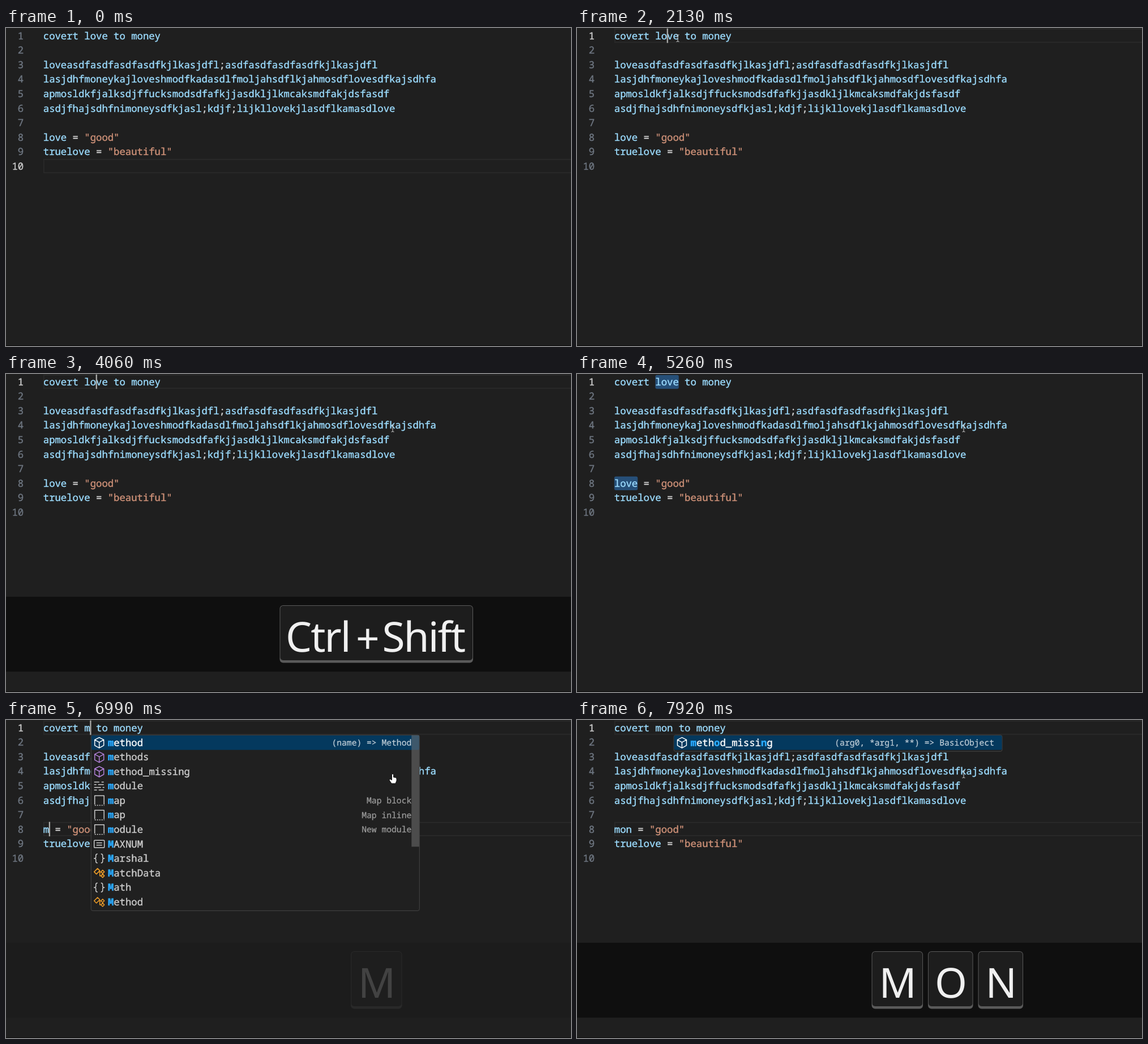
Write an HTML page that moves like this. It is 998 px wide and 561 px high and loops after 8 s.

```html
<!DOCTYPE html>
<html lang="en">
<head>
<meta charset="utf-8">
<title>Multi-cursor editing</title>
<style>
html, body { margin: 0; width: 100%; height: 100%; overflow: hidden; background: #1f1f1f; }
svg { display: block; width: 998px; height: 561px; }
text { white-space: pre; text-rendering: geometricPrecision; }
.mono { font: 17.27px "Noto Sans Mono", monospace; stroke-width: .4px; }
.detail { font: 14.68px "Noto Sans Mono", monospace; text-anchor: end; stroke-width: .25px; }
.key { font: 73px "Noto Sans", "Open Sans", sans-serif; letter-spacing: -2px; stroke: none; }
.icon { fill: none; stroke-width: 1.5; stroke-linejoin: round; }
</style>
</head>
<body>
<svg id="stage" viewBox="0 0 998 561"></svg>
<script>
const stage = document.getElementById('stage');
const LOOP = 8000, CHAR = 10.362, ROW = 25.56, LEFT = 65.8;
const colX = c => LEFT + c * CHAR;
const rowY = r => 0.8 + (r - 1) * ROW;
const baseY = r => 19.8 + (r - 1) * ROW;

const CLICK = 2060, SELECT = 4460;
const BLINKS = [[2600, 3060], [3530, 4060], [4990, 5460], [5990, 6450], [7920, 8000]];
const within = (t, a, b) => t >= a && t < b;
const esc = s => s.replace(/&/g, '&amp;').replace(/</g, '&lt;').replace(/>/g, '&gt;');

const rect = (x, y, w, h, fill, more = '') =>
  `<rect x="${x}" y="${y}" width="${w}" height="${h}" fill="${fill}" ${more}/>`;
// A hairline stroke in the text colour gives the slightly heavier editor face
const ink = color => `fill="${color}" stroke="${color}"`;
const text = (x, y, body, cls, color, more = '') =>
  `<text x="${x}" y="${y}" class="${cls}" ${ink(color)} ${more}>${body}</text>`;
const span = (body, color, more = '') => `<tspan ${ink(color)} ${more}>${body}</tspan>`;

const typedAt = t => t < 6990 ? 'love' : t < 7190 ? 'm' : t < 7390 ? 'mo' : 'mon';

const codeLines = word => [
  `covert ${word} to money`,
  '',
  'loveasdfasdfasdfasdfkjlkasjdfl;asdfasdfasdfasdfkjlkasjdfl',
  'lasjdhfmoneykajloveshmodfkadasdlfmoljahsdflkjahmosdflovesdfkajsdhfa',
  'apmosldkfjalksdjffucksmodsdfafkjjasdkljlkmcaksmdfakjdsfasdf',
  'asdjfhajsdhfnimoneysdfkjasl;kdjf;lijkllovekjlasdflkamasdlove',
  '',
  `${word} = "good"`,
  'truelove = "beautiful"',
  ''
];

const colorize = line => (line.match(/"[^"]*"|[;=]|[^";=]+/g) || [])
  .map(p => span(p, p[0] === '"' ? '#ce9178' : /^[;=]$/.test(p) ? '#d4d4d4' : '#9cdcfe'))
  .join('');

function editor(t) {
  const word = typedAt(t), active = t < CLICK ? 10 : 1;
  const selecting = within(t, SELECT, 6990), multi = t >= SELECT;
  let out = '';
  if (!selecting) {
    for (const r of t >= 6990 ? [1, 8] : [active])
      out += rect(LEFT + 1, rowY(r) + 1, 940, 23.4, 'none', 'stroke="#292929" stroke-width="2"');
  } else {
    for (const [r, c] of [[1, 7], [8, 0]])
      out += rect(colX(c), rowY(r) + 1, 4 * CHAR, 24.4, '#264f78', 'rx="3"');
  }
  codeLines(word).forEach((line, i) => {
    const r = i + 1;
    out += text(31.2, baseY(r), r, 'mono', r === active ? '#cccccc' : '#6e7681', 'text-anchor="end"');
    if (line) out += text(LEFT, baseY(r), colorize(line), 'mono', '#9cdcfe');
  });
  if (t >= CLICK && !BLINKS.some(b => within(t, ...b))) {
    const spots = multi ? [[1, 7 + word.length], [8, word.length]] : [[1, 9]];
    for (const [r, c] of spots) out += rect(colX(c) - 0.4, rowY(r), 2.2, ROW, '#aeafad');
  }
  return out;
}

// Icons are drawn around (0, 0)
const ICONS = {
  method: ['#b180d7', '<path d="M0-9 8-5V5L0 9.5-8 5V-5ZM-8-5 0-.5 8-5M0-.5V9.5"/>'],
  keyword: ['#cccccc', '<path d="M-9-7H0M4-7H8M-9-2.5H-5M-2-2.5H8M-9 2.5H3M6 2.5H9M-9 7H-4M-1 7H8"/>'],
  snippet: ['#cccccc', '<path d="M-8 7V-8.5H8.5V7"/><path d="M-8 8.5H9" stroke-dasharray="2 2"/>'],
  constant: ['#cccccc', '<rect x="-9" y="-6.5" width="18" height="13" rx="1"/><path d="M-5-2H5M-5 2H5"/>'],
  module: ['#cccccc', '<path d="M-3-8Q-6-8-6-5V-2Q-6 0-9 0-6 0-6 2V5Q-6 8-3 8M3-8Q6-8 6-5V-2Q6 0 9 0 6 0 6 2V5Q6 8 3 8"/>'],
  class: ['#ee9d28', '<path d="M-9-2-3-8 1-4-5 2ZM-1-2H4M1-2V5H4M6-5 9-2 6 1 3-2ZM6 2 9 5 6 8 3 5Z"/>']
};

const SUGGEST = {
  m: [
    ['method', 'method', '(name) => Method'],
    ['method', 'methods'],
    ['method', 'method_missing'],
    ['keyword', 'module'],
    ['snippet', 'map', 'Map block'],
    ['snippet', 'map', 'Map inline'],
    ['snippet', 'module', 'New module'],
    ['constant', 'MAXNUM'],
    ['module', 'Marshal'],
    ['class', 'MatchData'],
    ['module', 'Math'],
    ['class', 'Method']
  ],
  mo: [
    ['keyword', 'module'],
    ['snippet', 'module', 'New module'],
    ['class', 'Module'],
    ['method', 'method', '(name) => Method'],
    ['method', 'methods'],
    ['method', 'method_missing'],
    ['class', 'Method']
  ],
  mon: [['method', 'method_missing', '(arg0, *arg1, **) => BasicObject']]
};

function matched(label, query, color) {
  let q = 0;
  return [...label].map(ch => {
    const hit = q < query.length && ch.toLowerCase() === query[q];
    if (hit) q++;
    return hit ? span(ch, '#2aaaff', 'font-weight="700"') : span(ch, color);
  }).join('');
}

const queryAt = t => t < 6990 ? '' : t < 7260 ? 'm' : t < 7450 ? 'mo' : 'mon';

function popup(t) {
  const query = queryAt(t);
  if (!query) return '';
  const items = SUGGEST[query], x = colX(7 + query.length) + 1.6, top = 27;
  let out = rect(x, top - 0.3, 580, items.length * ROW + 3, '#202020', 'rx="3" stroke="#454545"');
  out += rect(x + 0.5, top + 0.3, 579, ROW, '#04395e', 'rx="2"');
  items.forEach(([icon, label, detail], i) => {
    const y = baseY(i + 2) + 0.3, on = i === 0;
    const [color, shape] = ICONS[icon];
    out += `<g class="icon" transform="translate(${x + 14.4} ${y - 5.8})" stroke="${on ? '#fff' : color}">${shape}</g>`;
    out += text(x + 29.6, y, matched(label, query, on ? '#ffffff' : '#cccccc'), 'mono', '#cccccc');
    if (detail) out += text(x + 566, y - 0.8, esc(detail), 'detail', on ? '#c0cdd7' : '#9d9d9d');
  });
  if (items.length > 11) out += rect(x + 566, top, 13.5, 196.5, '#797979', 'fill-opacity=".5"');
  return out;
}

function keycap(x, w, parts) {
  return rect(x, 408, w, 101.5, '#5a5a5a', 'rx="6"') +
    rect(x + 1, 409, w - 2, 96, '#1d1d1d', 'rx="5"') +
    parts.map(([dx, s]) => text(x + dx, s === '+' ? 493 : 490, s, 'key', '#f0f0f0')).join('');
}

function overlay(t) {
  const start = within(t, 3330, 5260) ? 3330 : t >= 6990 ? 6990 : 0;
  if (!start) return '';
  const age = t - start, alpha = age < 70 ? 0.17 : age < 130 ? 0.55 : 1;
  let keys = '';
  if (start === 3330) {
    const parts = [[10.5, 'Ctrl'], [134.5, '+'], [181, 'Shift']];
    const full = t >= SELECT;
    if (full) parts.push([337, '+'], [381.5, 'L']);
    keys = keycap(full ? 440 : 483.5, full ? 429 : 341.5, parts);
  } else {
    const letters = [...typedAt(t).toUpperCase()];
    const width = c => c === 'M' ? 90.5 : 79.5;
    const total = letters.reduce((sum, c) => sum + width(c) + 9, -9);
    let x = 654.3 - total / 2;
    for (const c of letters) {
      keys += keycap(x, width(c), [[c === 'O' ? 12 : 13, c]]);
      x += width(c) + 9;
    }
  }
  return `<g opacity="${alpha}">${rect(0, 393, 998, 132, '#000', 'fill-opacity=".52"')}${keys}</g>`;
}

// The pointer is sampled about 15 times per second
const MOVES = [
  [990, 1730, 854, 452, 168, 15],
  [1800, 2130, 168, 15, 178, 18],
  [2133, 2330, 178, 18, 683, 96]
];

function pointer(t) {
  if (t < 990) return '';
  const [a, b, x0, y0, x1, y1] = MOVES.filter(m => t >= m[0]).pop();
  const step = Math.floor((t - a) / 66.5) * 66.5;
  const p = t >= b ? 1 : Math.min(1, step / (b - a));
  const e = p * p * (3 - 2 * p);
  const x = x0 + (x1 - x0) * e, y = y0 + (y1 - y0) * e;
  const hand = queryAt(t) === 'm' || queryAt(t) === 'mo';
  const shape = hand
    ? '<path d="M-1.5 0Q0-2 1.5 0V5L5 5.5Q7 6 7 8V11L5 16H-2L-6 10Q-6 8-4 8.5L-1.5 10Z" fill="#fff" stroke="#000" stroke-width=".8"/>'
    : '<path d="M-2.5-6H-.8L0-5 .8-6H2.5M0-5V5M-2.5 6H-.8L0 5 .8 6H2.5" fill="none" stroke="#d0d0d0"/>';
  return `<g transform="translate(${x.toFixed(1)} ${y.toFixed(1)})">${shape}</g>`;
}

let last = '';
function draw(now) {
  const t = now % LOOP;
  const scene = rect(0, 0, 998, 561, '#1f1f1f') + editor(t) + overlay(t) + popup(t) +
    pointer(t) + rect(0, 560, 998, 1, '#0c0c0c');
  if (scene !== last) stage.innerHTML = last = scene;
  requestAnimationFrame(draw);
}
draw(performance.now());
</script>
</body>
</html>
```
